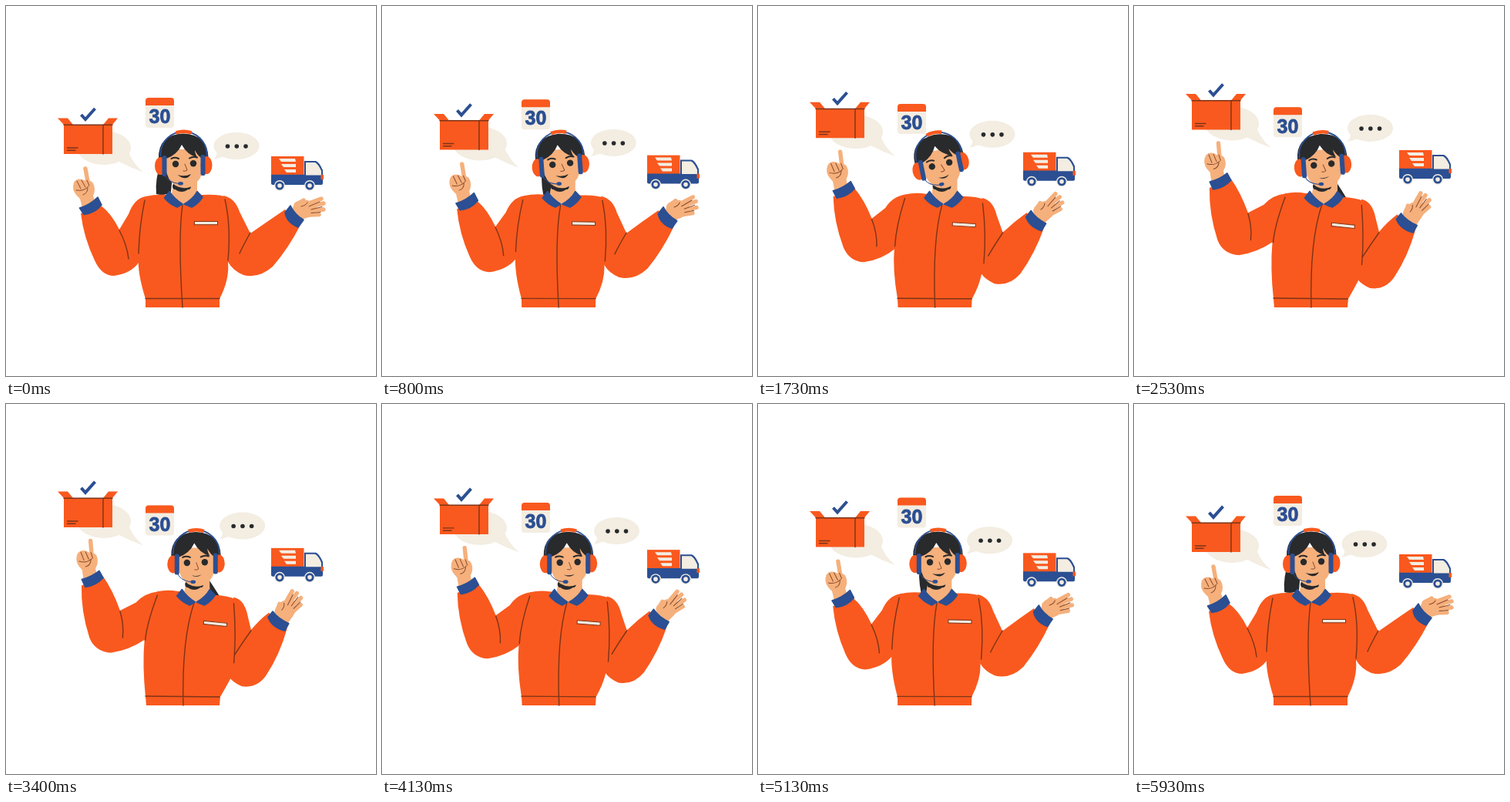
An HTML page for the animation above (5990 ms loop, 480 by 480 pixels).

```html
<!DOCTYPE html>
<html lang="en">
<head>
<meta charset="utf-8">
<title>Delivery support agent</title>
<style>
  html, body { margin: 0; width: 100%; height: 100%; overflow: hidden; background: #fff; }
  svg { display: block; width: 100vw; height: 100vh; }
  .orange { fill: #f9591e; }
  .blue { fill: #2b4f92; }
  .cream { fill: #f3ede2; }
  .skin { fill: #f5b07c; }
  .dark { fill: #282a2c; }
  .cloth { fill: #2b4f92; stroke: #2b4f92; stroke-width: 1.6; stroke-linejoin: round; }
  .line { fill: none; stroke: #7d3418; stroke-width: 1.4; stroke-linecap: round; }
  .crease { fill: none; stroke: #8a4a2c; stroke-width: 1; stroke-linecap: round; }
  .finger { fill: none; stroke: #f5b07c; stroke-width: 5.4; stroke-linecap: round; }
  .wire { fill: none; stroke: #2b4f92; stroke-width: 1.8; stroke-linecap: round; }
  .day { font: 700 25px "Liberation Sans", Arial, sans-serif; text-anchor: middle; stroke: #2b4f92; stroke-width: 0.8; }
</style>
</head>
<body>
<svg viewBox="0 0 480 480">
  <g id="parcel">
    <g class="cream">
      <ellipse cx="127" cy="184" rx="35" ry="22"/>
      <path d="M159 190 Q166 206 178 215.500 Q162 210 147 202Z"/>
    </g>
    <path class="orange" d="M75 154H138V192H75ZM67 145.500H80L87 154H75ZM133 145.500H145L138 154H126Z"/>
    <path class="line" d="M75 154.300H138M126 154V192M79.500 184H93M79.500 187.300H90"/>
    <path class="wire" style="stroke-width:4;stroke-linecap:butt" d="M97.500 141 L103 147 L115.500 133"/>
  </g>

  <g id="calendar">
    <rect class="cream" x="181" y="119" width="37" height="39" rx="4"/>
    <path class="orange" d="M181 129V123Q181 119 185 119H214Q218 119 218 123V129Z"/>
    <text class="day blue" x="199.500" y="152.300">30</text>
  </g>

  <g id="truck">
    <rect class="orange" x="344" y="195" width="42.500" height="26"/>
    <path class="blue" d="M344 218.800H387V201H402Q406 202 411 213V230Q411 232 409 232H346Q344 232 344 230Z"/>
    <path class="cream" d="M389 203H401Q405 205 409 214V219.500H389Z"/>
    <path class="orange" d="M408.500 219H412V225H408.500Z"/>
    <path class="cream" d="M354 198H375L376 202H357ZM357 205H376V209H360ZM361 212H376V216H364Z"/>
    <g id="wheels"></g>
  </g>

  <g id="chat">
    <ellipse class="cream" cx="299" cy="181.500" rx="29.500" ry="17.500"/>
    <path class="cream" d="M273 186 Q275 193 269.500 199 Q279 197 284 194Z"/>
    <g class="dark">
      <circle cx="287.500" cy="182" r="2.800"/><circle cx="299.300" cy="182" r="2.800"/><circle cx="311" cy="182" r="2.800"/>
    </g>
  </g>

  <path id="tail" class="dark"/>
  <g id="neck">
    <path class="skin" d="M218 222H248V244L230 259L215 246Z"/>
    <ellipse class="dark" cx="228" cy="234" rx="12" ry="7"/>
  </g>

  <g id="pointing">
    <path class="finger" d="M103 211 L107 233"/>
    <path class="skin" d="M88 229 Q85 238 91 245 L96 250 L99 262 L116 256 L113 246 Q117 238 113 230 Q110 225 104 227 Q93 221 88 229Z"/>
    <path class="crease" d="M92 227 L97 237 M98 226 L103 235 M105 226 L108 233 M91 239 Q101 241 107 234 M106 236 Q106 243 100 245"/>
  </g>
  <g id="open">
    <path class="skin" d="M370 268 L374 256 Q380 250 392 252 L403 261 Q402 272 390 275 L379 278Z"/>
    <path class="finger" d="M390 257 L409 250 M394 260 L412 256 M396 265 L412 264 M392 271 L406 270.500 M378 257 L386 252"/>
    <path class="crease" d="M393 260 L407 254 M396 264 L410 260.500 M396 268.500 L408 267.500 M383 260 Q389 259 391 255"/>
  </g>

  <path id="armL" class="orange"/>
  <path id="armR" class="orange"/>
  <path id="torso" class="orange"/>
  <path id="seams" class="line"/>
  <path id="cuffL" class="cloth"/>
  <path id="cuffR" class="cloth"/>

  <g id="collar">
    <path class="skin" d="M216 238H248V243L230 258L215 245Z"/>
    <path class="dark" d="M217 234 H239 Q235 241 228 241 Q220 241 217 234Z"/>
    <path class="cloth" d="M212 240.500 Q218 250 229 257 L222 261 Q212 257 205.500 249Z M248 240.500 Q243 250 231 257 L241 261 Q249 257 255 248Z"/>
  </g>
  <rect id="badge" x="244.500" y="279.500" width="30" height="4.200" fill="#f3ede2" stroke="#7d3418"/>

  <g id="head">
    <path class="skin" d="M205 186 L207 210 Q209 226 220 233 Q230 239 241 234 Q254 226 256 210 V186Z"/>
    <g id="face">
      <circle class="dark" cx="220" cy="205" r="4.200"/>
      <circle class="dark" cx="243" cy="204.300" r="4.200"/>
      <path class="line" style="stroke:#282a2c;stroke-width:2" d="M214.500 198 Q219 195.500 224 198 M238 197.500 Q243 194.500 248 196.500"/>
      <path class="crease" d="M232 205 L235 213 Q233 215 230 214"/>
      <path id="mouth" class="dark"/>
    </g>
    <path class="dark" d="M198 198 Q197 167 230 165.500 Q262 167 262.500 197 L256 199 Q249 195 245 187 Q245 191 248 196.500 Q235 193 228 180 Q222 193 208 198 L207 203Z"/>
    <path class="wire" d="M200.500 194 V192 A30 29 0 0 1 260.500 192 V194"/>
    <path d="M220.500 164.300 Q230.500 161 240.500 164.300" fill="none" stroke="#f9591e" stroke-width="4.500"/>
    <ellipse class="orange" cx="200.500" cy="207.500" rx="7.500" ry="11.500"/>
    <ellipse class="orange" cx="260" cy="206.500" rx="7.500" ry="11.500"/>
    <rect class="blue" x="202.500" y="194" width="6" height="27" rx="2.500"/>
    <rect class="blue" x="252.500" y="193" width="6" height="27" rx="2.500"/>
    <path class="wire" style="stroke-width:1" d="M206 219 Q210 229 224 230.500"/>
    <ellipse class="blue" cx="226.500" cy="230.300" rx="3.400" ry="2.300"/>
  </g>
</svg>

<script>
const LOOP = 5990;
const $ = id => document.getElementById(id);

// Each shape blends from its first pose to its second.
const shapes = {
  tail: ['M201 203 Q193 225 195 244 Q206 247 214 241 L217 208Z',
         'M248 203 Q267 228 281 250 Q270 252 262 246 L246 215Z'],
  armL: ['M181 247 Q166 250 159 270 L147 290 Q136 268 123 259 L97 269 Q101 301 115 330 Q124 350 140 350 Q162 347 172 333 L185 300Z',
         'M198 243 Q180 245 169 257 L148 267 Q139 241 126 222 L98 234 Q97 268 108 302 Q115 320 136 321.5 Q160 318 181 304 L200 300Z'],
  armR: ['M282 246 Q297 249 303 267 L317 295 Q340 279 362 264 L382 284 Q366 315 346 338 Q328 354 308 349 Q294 343 288 332 L278 300Z',
         'M296 251 Q310 254 314 275 L318 293 Q328 280 340 271 L364 291 Q355 325 337 353 Q325 370 306 367 Q296 363 290 356 L285 300Z'],
  torso: ['M181 247 Q195 244 208 245 L255 245 Q277 244 285 248 Q293 290 288 333 Q290 355 277 380 L277 391 L181 391 L181 380 Q170 345 172 325 Q174 280 181 247Z',
          'M197 243 Q210 240 224 243 L271 248 Q290 249 299 254 Q304 300 291 358 Q285 368 278 380 L277 391 L182 391 L181 380 Q177 340 180 305 Q186 275 197 243Z'],
  seams: ['M229 258 Q223 300 229 391 M180 252 Q173 285 172 321 M284 251 Q292 285 288 330 M147 291 Q157 310 159 328 M317 294 Q308 310 303 321 M181 379.5 L277 379.5',
          'M245 257 Q228 305 230 391 M197 248 Q183 285 181 306 M296 259 Q299 300 296 336 M148 268 Q153 285 151 302 M318 294 Q305 312 296 326 M181 379 L277 380'],
  cuffL: ['M95.5 262 Q109 258 119 248 L124 258 Q115 269 101 270.5Z',
          'M98.5 226 Q111 223 121 215 L126 224 Q117 234 103 236Z'],
  cuffR: ['M369 259 Q374 270 386 277.5 L379 287 Q364 281 362 268Z',
          'M345 269.5 Q352 279 366 285 L361 294.5 Q344 290 339 277Z'],
  mouth: ['M222.500 219 Q232 222 240 218 Q234 228 222.500 219Z',
          'M226 221.500 Q233 223.500 239 220.500 Q233 225 226 221.500Z']
};

function mix(a, b, p) {
  const to = b.match(/[\d.]+/g);
  let i = 0;
  return a.replace(/[\d.]+/g, n => (+n + (to[i++] - n) * p).toFixed(2));
}

function place(id, x, y, turn = 0, cx = 0, cy = 0) {
  $(id).setAttribute('transform', `translate(${x} ${y}) rotate(${turn} ${cx} ${cy})`);
}

// The picture holds for 130 ms and 70 ms in turn.
function hold(t) {
  const rest = t % 200;
  return t - rest + (rest >= 130 ? 130 : 0);
}

function headTilt(t) {
  const q = (t - 240) / 2850;
  return q > 0 && q < 1 ? -12 * Math.sin(Math.PI * q) ** 2 : 0;
}

function draw(t) {
  const p = (1 - Math.cos(2 * Math.PI * t / 6000)) / 2;
  for (const id in shapes) $(id).setAttribute('d', mix(...shapes[id], p));
  place('parcel', 0, -33.5 * p);
  place('calendar', 0, 13 * p);
  place('truck', 0, -8.5 * p);
  place('chat', 8 * p, -24.5 * p);
  place('neck', 17 * p, 0);
  place('collar', 17 * p, 0);
  place('badge', 12.5 * p, 3.5 * p, 6 * p, 259.5, 281.5);
  place('pointing', 3 * p * p, -35 * p, 6 * p, 106, 250);
  place('open', -19 * p, 11 * p, -42 * p, 375, 268);
  place('head', 17 * p, 0.5 * p, headTilt(t), 230, 225);
  place('face', -1.5 * p, 0.5 * p);
}

$('wheels').innerHTML = [355, 394].map(x =>
  `<circle class="cream" cx="${x}" cy="233" r="7"/>
   <circle class="blue" cx="${x}" cy="233" r="5.600"/>
   <circle class="cream" cx="${x}" cy="233" r="2.800"/>`).join('');

const start = performance.now();
function tick() {
  draw(hold((performance.now() - start) % LOOP));
  requestAnimationFrame(tick);
}
tick();
</script>
</body>
</html>
```
